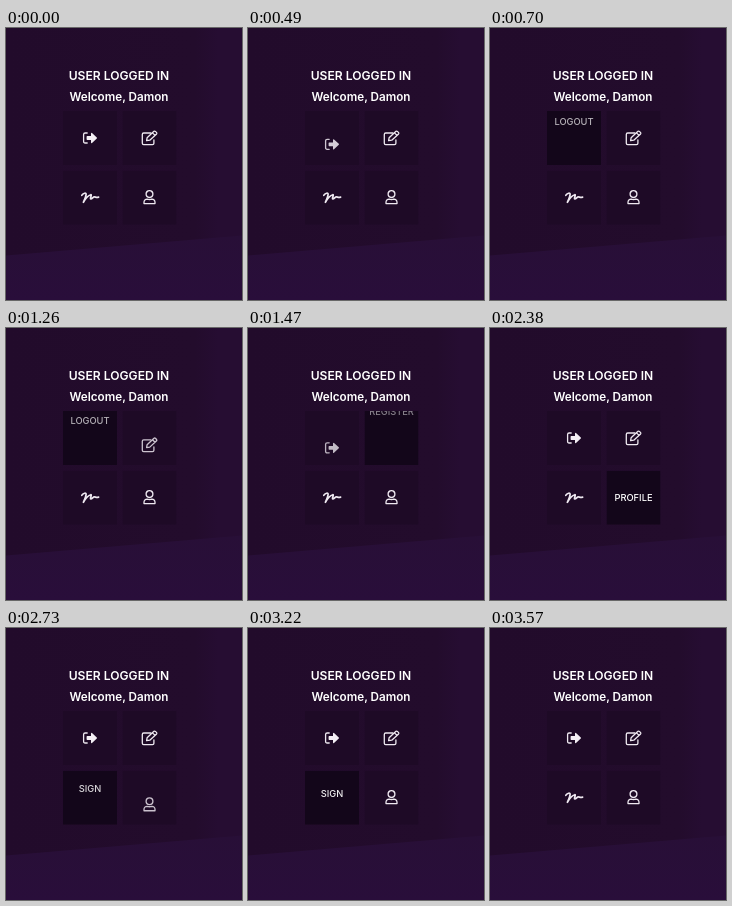
An HTML page that plays this animation: 236x272 px, repeating every 3.64 s.

```html
<!DOCTYPE html>
<html lang="en">
<head>
<meta charset="utf-8">
<title>User menu</title>
<style>
  html, body { margin: 0; width: 100%; height: 100%; overflow: hidden; background: #230c2c; }
  svg { display: block; width: 100%; height: 100%; }
  text { font-family: Inter, "Open Sans", sans-serif; font-weight: 600; fill: #fff; text-anchor: middle; }
  .label { font-size: 9.3px; font-weight: 500; }
  .line { fill: none; stroke: #eee8f0; stroke-width: 1.3; stroke-linecap: round; stroke-linejoin: round; }
  .solid { fill: #f4eff5; }
</style>
</head>
<body>
<svg viewBox="0 0 236 272">
  <defs>
    <linearGradient id="night">
      <stop offset="0" stop-color="#220b2b"/>
      <stop offset="0.8" stop-color="#230c2c"/>
      <stop offset="0.9" stop-color="#260d32"/>
    </linearGradient>
    <linearGradient id="glow" x1="0" y1="0" x2="0" y2="1">
      <stop offset="0" stop-color="#280f37"/>
      <stop offset="1" stop-color="#290e3a"/>
    </linearGradient>
    <g id="logout">
      <path class="line" d="M-2.8-5H-4.9Q-6.4-5-6.4-3.5V3.5Q-6.4 5-4.9 5H-2.8" stroke-width="1.5"/>
      <path class="solid" d="M-2.8-1.9H1V-4.6Q1.2-5.5 2-4.9L6.8-.5Q7.2 0 6.8.5L2 4.9Q1.2 5.5 1 4.6V1.9H-2.8Q-3.4 1.9-3.4 1.3V-1.3Q-3.4-1.9-2.8-1.9Z"/>
    </g>
    <g id="register" class="line">
      <path d="M1.3-5H-5.8Q-7.2-5-7.2-3.6V5.2Q-7.2 6.6-5.8 6.6H3Q4.4 6.6 4.4 5.2V2"/>
      <path d="M-2.9 2.6L-2.4-.2 4.5-6.7Q5.2-7.2 5.9-6.6L7.1-5.4Q7.6-4.7 7.1-4.1L.3 2.2ZM3-5.1L5.5-2.6"/>
    </g>
    <g id="sign">
      <path class="line" style="stroke-width:1.7" d="M-8.2-2.4C-6.6-4.4-3.6-5.6-3.9-3C-4.2-.6-5.6 2-6.6 4.6C-4.6 1-1.4-2.4.8-3C2.2-3.2-.4 1 .8 1.3C2.2 1.4 3-.8 4.4-.8C5.6-.8 6.4.2 8.6-.6"/>
    </g>
    <g id="profile" class="line">
      <circle cy="-3.6" r="3.4"/>
      <path d="M-5.5 5.9V4.5C-5.5 2.5-4.2 1.5-2.4 1.5Q0 2.3 2.4 1.5C4.2 1.5 5.5 2.5 5.5 4.5V5.9Z"/>
    </g>
    <clipPath id="tileClip"><rect x="-27" y="-27" width="54" height="54"/></clipPath>
  </defs>
  <rect width="236" height="272" fill="url(#night)"/>
  <path d="M0 227.5L236 207.5V272H0Z" fill="url(#glow)"/>
  <text x="113" y="51.8" font-size="12.1">USER LOGGED IN</text>
  <text x="113" y="73.4" font-size="11.7">Welcome, Damon</text>
  <g id="tiles"></g>
</svg>
<script>
const LOOP = 3640, ARRIVE = 175, LABEL_SHIFT = 42, ICON_SHIFT = 33;

// enter / leave: [start, swap] in ms
const tiles = [
  { name: 'logout',   x: 84,    y: 110,   enter: [350, 595],   leave: [1010, 1348] },
  { name: 'register', x: 143.5, y: 110,   enter: [1050, 1405], leave: [1820, 2134] },
  { name: 'sign',     x: 84,    y: 169.7, enter: [2455, 2594], leave: [3090, 3370] },
  { name: 'profile',  x: 143.5, y: 169.7, enter: [1820, 2134], leave: [2455, 2594] }
];

const clamp = v => Math.max(0, Math.min(1, v));

function make(tag, attrs, parent) {
  const el = document.createElementNS('http://www.w3.org/2000/svg', tag);
  for (const key in attrs) el.setAttribute(key, attrs[key]);
  return parent.appendChild(el);
}

for (const tile of tiles) {
  const group = make('g', { transform: `translate(${tile.x} ${tile.y})`, 'clip-path': 'url(#tileClip)' },
    document.getElementById('tiles'));
  tile.back = make('rect', { x: -27, y: -27, width: 54, height: 54 }, group);
  tile.icon = make('use', { href: '#' + tile.name }, group);
  tile.label = make('text', { class: 'label', y: 3.4 }, group);
  tile.label.textContent = tile.name.toUpperCase();
}

// 1 = resting in view, 0 = fully gone
const departing = (t, [start, swap]) => 1 - clamp((t - start) / (swap - start)) ** 3;
const arriving = (t, swap) => clamp((t - swap) / ARRIVE);

function place(el, shown, shift) {
  el.setAttribute('transform', `translate(0 ${(1 - shown) * shift})`);
  el.setAttribute('opacity', shown ** 0.75);
}

function render(t) {
  for (const { enter, leave, back, icon, label } of tiles) {
    const open = t >= enter[1] && t < leave[1];
    const labelShown = open ? Math.min(arriving(t, enter[1]), departing(t, leave)) : 0;
    const iconShown = open ? 0 : t < enter[1] ? departing(t, enter) : arriving(t, leave[1]);
    back.setAttribute('fill', open ? '#13061a' : '#1e0a26');
    place(label, labelShown, -LABEL_SHIFT);
    place(icon, iconShown, ICON_SHIFT);
  }
}

const begin = performance.now();
function tick() {
  render((performance.now() - begin) % LOOP);
  requestAnimationFrame(tick);
}
tick();
</script>
</body>
</html>
```
